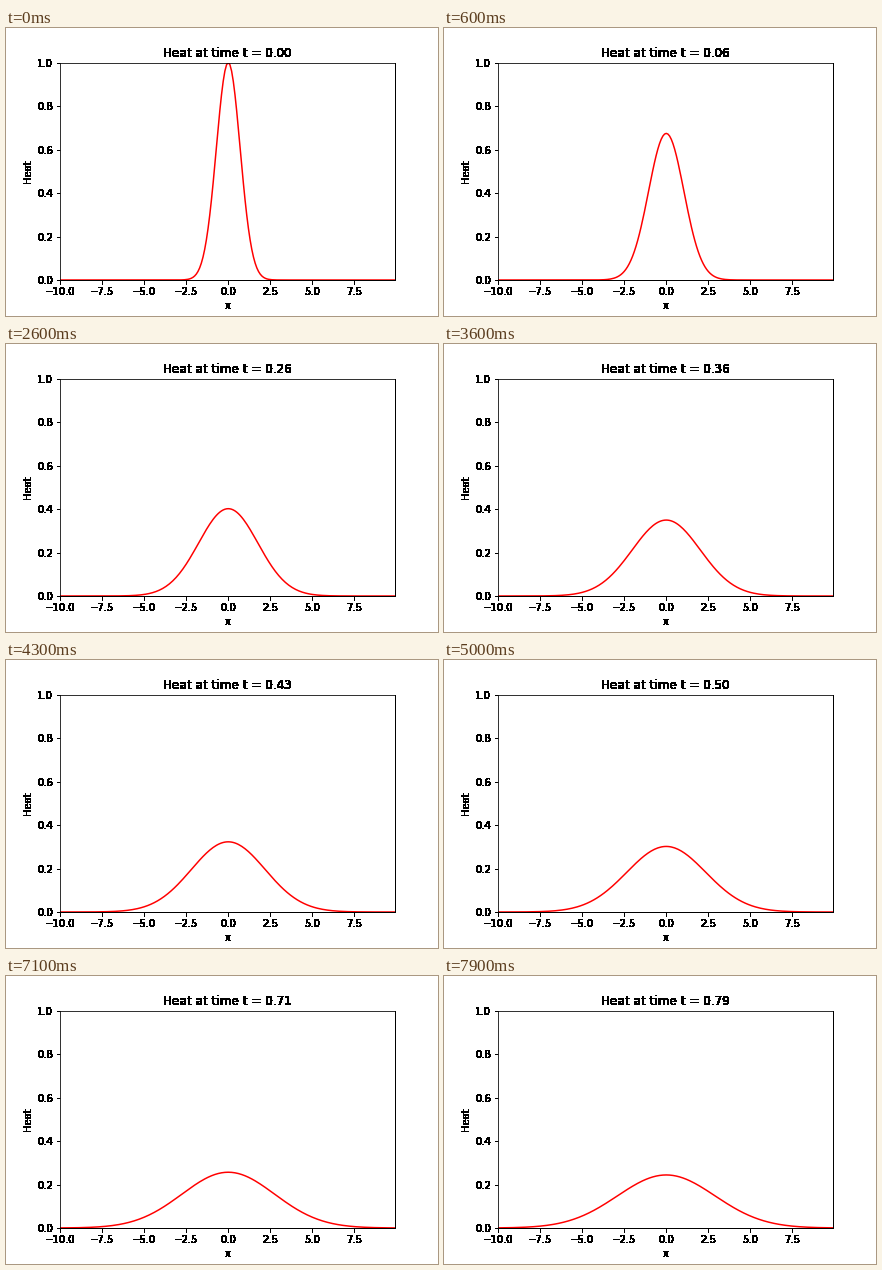
These frames come from a looping animation (432 by 288 pixels, 8000 ms). A matplotlib script:

```python
import numpy as np
import matplotlib.pyplot as plt
from matplotlib.animation import FuncAnimation

FRAMES, INTERVAL = 80, 100
DIFFUSIVITY = 5.0
DT = 0.01

plt.rcParams.update({"font.family": "DejaVu Sans", "font.size": 10})


def heat(x, t):
    """Spreading Gaussian that starts as exp(-x^2)."""
    spread = 1 + 4 * DIFFUSIVITY * t
    return np.exp(-x**2 / spread) / np.sqrt(spread)


def hard_edges(img, dpi):
    """Make every touched pixel opaque, so text gets crisp, heavy edges."""
    img = img.copy()
    img[..., 3] = img[..., 3] > 0
    return img, 0, 0


x = np.arange(200) * 0.1 - 10

fig = plt.figure(figsize=(6, 4), dpi=72, facecolor="white")
fig.subplots_adjust(left=0.125, right=0.9, bottom=0.125, top=0.88)
ax = fig.add_subplot()
ax.set_agg_filter(hard_edges)
ax.set(xlabel="x", ylabel="Heat")
ax.set_xticks(np.arange(-10, 10, 2.5))
ax.set_yticks(np.linspace(0, 1, 6))
ax.set_xlim(x[0], x[-1])
ax.set_ylim(0, 1)
line, = ax.plot(x, heat(x, 0), color="red", lw=1.5)
title = ax.set_title("")


def update(i):
    t = i * DT
    line.set_ydata(heat(x, t))
    title.set_text(f"Heat at time t = {t:.2f}")
    return line, title


anim = FuncAnimation(fig, update, frames=FRAMES, interval=INTERVAL,
                     repeat=True, repeat_delay=0, blit=False)
plt.show()
```
